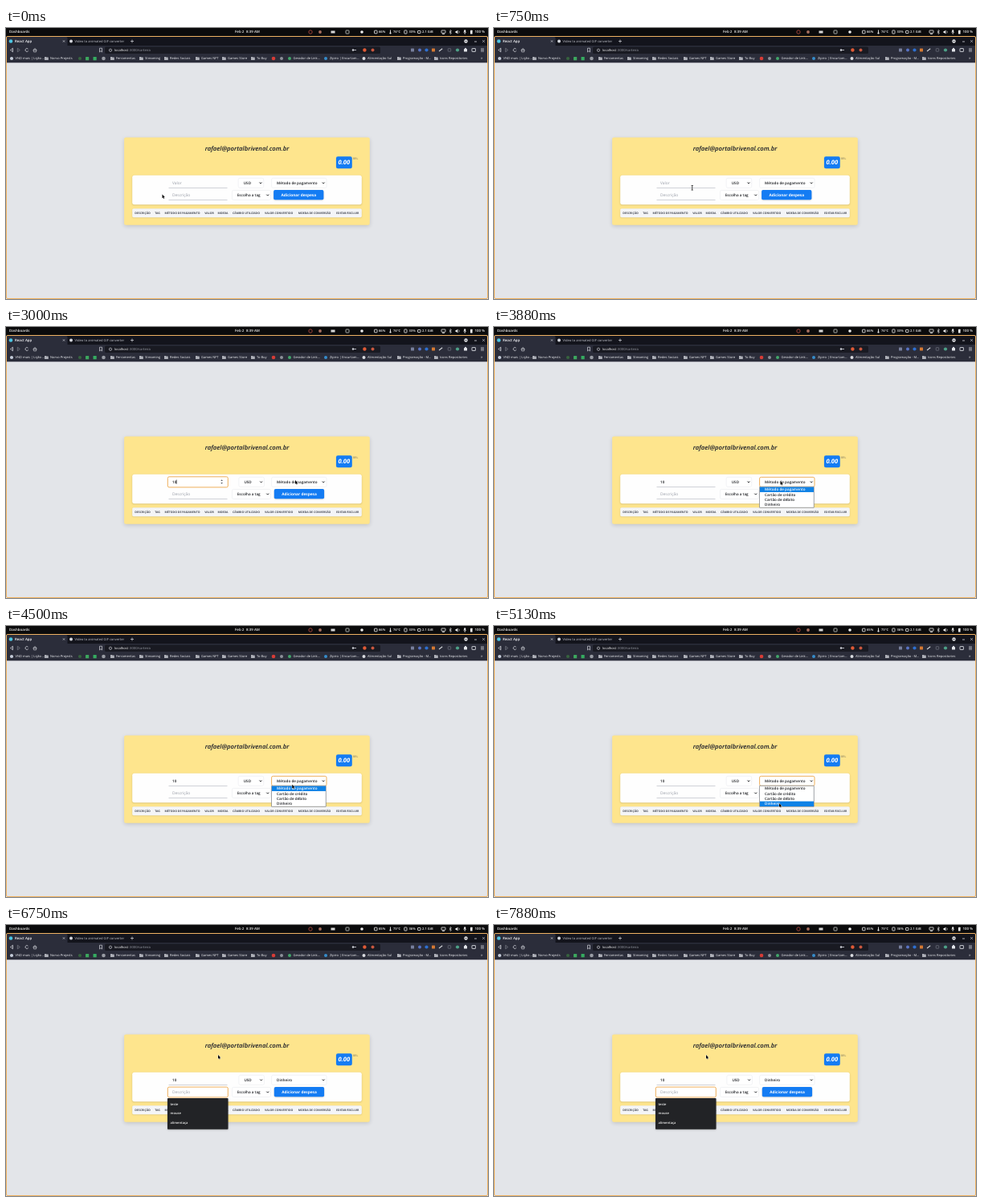
These frames come from a looping animation (600 by 338 pixels, 8 s). An HTML page with a canvas:

```html
<!DOCTYPE html>
<html lang="pt-BR">
<head>
<meta charset="utf-8">
<title>Carteira</title>
<style>
html, body { margin: 0; width: 100%; height: 100%; overflow: hidden; background: #e3e5e9; }
canvas { display: block; width: 600px; height: 338px; }
</style>
</head>
<body>
<canvas id="stage"></canvas>
<script>
const LOOP = 8000, STEP = 125, TEXT_SCALE = 20;
const canvas = document.getElementById('stage');
const ctx = canvas.getContext('2d');
const dpr = window.devicePixelRatio || 1;
canvas.width = 600 * dpr;
canvas.height = 338 * dpr;

const ORANGE = '#efab52', BLUE = '#147cf3', INK = '#1a1c20', HINT = '#989da7', BAR = '#2b2d3a';

// Pointer path: time, x, y of the hotspot
const path = [
  [0, 194.5, 207.5], [500, 226, 203], [875, 254, 198], [1000, 212, 198], [1250, 212, 195],
  [2250, 212, 195], [2625, 290, 203], [3000, 360, 191], [3250, 356.5, 192], [4250, 356.5, 192],
  [5125, 355, 221], [5750, 255, 209], [6000, 255, 209], [6750, 264, 162], [8000, 264, 162]
];

function pointerAt(t) {
  const i = Math.max(1, path.findIndex(p => p[0] >= t));
  const [t0, x0, y0] = path[i - 1], [t1, x1, y1] = path[i];
  const k = (t - t0) / (t1 - t0), e = k * k * (3 - 2 * k);
  return { x: x0 + (x1 - x0) * e, y: y0 + (y1 - y0) * e };
}

const within = (t, from, to) => t >= from && t < to;
const blink = (t, from) => Math.floor((t - from) / 625) % 2 === 0;

function rect(x, y, w, h, color) {
  ctx.fillStyle = color;
  ctx.fillRect(x, y, w, h);
}

function round(x, y, w, h, r, fill, stroke, width = 1) {
  ctx.beginPath();
  ctx.roundRect(x, y, w, h, r);
  if (fill) { ctx.fillStyle = fill; ctx.fill(); }
  if (stroke) { ctx.strokeStyle = stroke; ctx.lineWidth = width; ctx.stroke(); }
}

function raised(x, y, w, h, r, fill, blur, alpha) {
  ctx.save();
  ctx.shadowColor = `rgba(0,0,0,${alpha})`;
  ctx.shadowBlur = blur * dpr;
  ctx.shadowOffsetY = blur * dpr / 3;
  round(x, y, w, h, r, fill);
  ctx.restore();
}

function dot(x, y, r, color) {
  ctx.beginPath();
  ctx.arc(x, y, r, 0, 7);
  ctx.fillStyle = color;
  ctx.fill();
}

function ring(x, y, r, color, width, from = 0, to = 7) {
  ctx.beginPath();
  ctx.arc(x, y, r, from, to);
  ctx.strokeStyle = color;
  ctx.lineWidth = width;
  ctx.stroke();
}

function line(points, color, width = 0.8) {
  ctx.beginPath();
  points.forEach(([x, y]) => ctx.lineTo(x, y));
  ctx.strokeStyle = color;
  ctx.lineWidth = width;
  ctx.stroke();
}

function poly(points, fill) {
  ctx.beginPath();
  points.forEach(([x, y]) => ctx.lineTo(x, y));
  ctx.closePath();
  ctx.fillStyle = fill;
  ctx.fill();
}

// y is the visual middle of the line; large layout size keeps the small advances precise
function text(str, x, y, size, color, style = '400', align = 'left') {
  ctx.save();
  ctx.translate(x, y + size * 0.32);
  ctx.scale(1 / TEXT_SCALE, 1 / TEXT_SCALE);
  ctx.font = `${style} ${size * TEXT_SCALE}px "Open Sans", "Noto Sans", sans-serif`;
  ctx.textRendering = 'geometricPrecision';
  ctx.textAlign = align;
  ctx.fillStyle = color;
  ctx.fillText(str, 0, 0);
  ctx.restore();
}

const chevron = (x, y, color = INK, s = 1.4) =>
  line([[x - s, y - s / 2], [x, y + s / 2], [x + s, y - s / 2]], color, 1);

function cross(x, y, s, color) {
  line([[x - s, y - s], [x + s, y + s]], color, 0.7);
  line([[x - s, y + s], [x + s, y - s]], color, 0.7);
}

function folder(x, y) {
  rect(x - 2.3, y - 2, 2.2, 1, '#aeb0b8');
  round(x - 2.3, y - 1.5, 4.8, 3.6, 0.5, '#aeb0b8');
}

function drawPanel(t) {
  rect(0, 0, 600, 10, '#0b0b0c');
  const later = t >= 4625, white = '#f2f2f2', bold = '600';
  text('Dashboards', 4, 5, 4.4, white, bold);
  text('Feb 2', 285, 5, 4.4, white, bold);
  text('8:39 AM', 299, 5, 4.4, white, bold);
  const stats = [
    [464, later ? '65%' : '66%'], [482, later ? '73°C' : '74°C'],
    [501.5, later ? '36%' : '33%'], [518, '2.1 GiB']
  ];
  stats.forEach(([x, s]) => text(s, x, 5, 4.1, white, bold));
  text('100 %', 583.5, 5, 4.4, white, bold);

  ring(379, 5, 2.2, '#a8473d', 0.9);
  dot(391, 5, 1.9, '#a9705f');
  rect(404.5, 3.5, 5, 3, '#d8d8d8');
  round(423, 3, 4, 4, 0.6, null, '#b9beb9', 0.9);
  dot(443, 5, 1.8, white);
  round(458.5, 3.2, 3.6, 3.6, 0.5, null, white, 0.8);
  line([[478.5, 2.5], [478.5, 6]], white, 0.9);
  dot(478.5, 6.5, 1.1, white);
  round(495.8, 3, 3.2, 4, 0.5, null, white, 0.8);
  round(512.5, 3.5, 3.6, 3, 0.4, null, white, 0.8);
  round(542, 3, 5, 3.2, 0.4, null, white, 0.8);
  line([[543, 7.5], [546, 7.5]], white);
  line([[551.8, 3.7], [554.5, 6.3], [553.2, 7.6], [553.2, 2.4], [554.5, 3.7], [551.8, 6.3]], white, 0.6);
  poly([[559.5, 4], [560.7, 4], [562.3, 2.5], [562.3, 7.5], [560.7, 6], [559.5, 6]], white);
  line([[563.6, 3.5], [564.3, 5], [563.6, 6.5]], white, 0.6);
  round(570.2, 2.2, 2, 3.6, 1, white);
  line([[569.3, 5], [571.2, 6.8], [573, 5]], white, 0.6);
  line([[571.2, 6.5], [571.2, 8]], white, 0.6);
  round(578, 2.8, 2.6, 4.8, 0.5, white);
}

function drawBrowser() {
  const pale = '#d3d5db';
  rect(0, 10, 600, 12, '#13141c');
  round(1, 11, 75.5, 12, [1.5, 1.5, 0, 0], BAR);
  rect(0, 22, 600, 21.3, BAR);

  dot(6, 16.5, 2.3, '#4cc4e2');
  text('React App', 11, 16.5, 4.4, '#f6f6f8', '600');
  cross(72, 16.5, 1.1, pale);
  dot(81, 16.5, 2, '#d5d7dd');
  text('Video to animated GIF converter', 85.5, 16.5, 4.1, '#c6c8d0');
  line([[155, 16.5], [159, 16.5]], pale, 0.7);
  line([[157, 14.5], [157, 18.5]], pale, 0.7);
  dot(572.5, 16.5, 2.2, '#e6e7ea');
  chevron(572.5, 16.6, '#13141c', 0.9);
  line([[583, 17], [586, 17]], pale, 0.8);
  cross(594.5, 16.5, 1.3, pale);

  line([[8.5, 25.2], [5.5, 27.5], [8.5, 29.8], [8.5, 25.2]], pale, 0.8);
  line([[14.3, 25.2], [17.3, 27.5], [14.3, 29.8], [14.3, 25.2]], '#777a85', 0.8);
  ring(26, 27.5, 2, pale, 0.8, 0.5, 5.6);
  line([[33.5, 27.8], [36, 25.5], [38.5, 27.8]], pale, 0.8);
  round(34.4, 27.4, 3.2, 2.4, 0.2, null, pale, 0.7);
  round(123, 23.5, 343, 8.6, 1.5, '#191a22');
  line([[116.5, 25.2], [119.5, 25.2], [119.5, 30], [118, 28.6], [116.5, 30], [116.5, 25.2]], pale, 0.7);
  ring(130, 27.7, 1.6, pale, 0.7);
  text('localhost', 135, 27.6, 4.1, '#fff');
  text(':3000/carteira', 153, 27.6, 4.15, '#9da0aa');
  dot(432, 27.5, 1.2, pale);
  line([[432.5, 27.5], [436, 27.5]], pale, 0.8);
  dot(446.4, 27.5, 2.2, '#df5a36');
  dot(456.5, 27.5, 2, '#c8573f');

  round(504, 25.5, 4, 4, 0.6, '#777f9c');
  dot(515, 27.5, 2, '#5873c4');
  dot(523.5, 27.5, 2.1, '#2d6fd0');
  round(530, 25.5, 4, 4, 0.4, '#d57932');
  line([[539, 29], [543.2, 25.8]], '#d2d4d8', 1.1);
  round(550.2, 25.7, 3.5, 3.5, 0.4, null, '#686b76', 0.8);
  dot(562, 27.5, 2.1, '#4da187');
  round(570, 26, 4, 3.6, 0.5, '#e2e4e9');
  dot(572, 25.8, 1, '#e2e4e9');
  round(580, 25.5, 4.4, 4, 0.4, null, pale, 0.9);
  [25.8, 27.5, 29.2].forEach(y => line([[591, y], [595, y]], pale, 0.7));

  dot(7, 38, 2.1, '#c3cad8');
  const marks = [
    [11.5, 'VND mais | Lição ...'], [55, 'Norvo Projects', 1], [137, 'Ferramentas', 1],
    [173, 'Streaming', 1], [204, 'Redes Sociais', 1], [243, 'Games NFT', 1],
    [276, 'Games Store', 1], [312, 'To Buy', 1], [357.5, 'Gerador de Link...'],
    [403, 'Zipiro | Encurtam...'], [450, 'Alimentação Sul'],
    [494, 'Programação - M...', 1], [540, 'Icons Repositories', 1]
  ];
  marks.forEach(([x, label, isFolder]) => {
    if (isFolder) folder(x - 4.7, 38);
    text(label, x, 38, 4.05, '#f3f4f7');
  });
  dot(92, 38, 2.1, '#37633f');
  round(99, 36, 4.2, 4.2, 0.5, '#3ca65d');
  round(108.5, 36, 4.2, 4.2, 0.5, '#35ab60');
  dot(121.5, 38, 2.3, '#9a9da5');
  dot(333, 38, 2.3, '#d63c36');
  dot(343, 38, 2, '#8d9099');
  dot(353, 38, 2, '#42a66a');
  dot(398, 38, 2, '#368cca');
  dot(445.5, 38, 2, '#d8dadf');
  text('»', 591, 37.6, 5, '#dcdde2');
}

function input(y, h, label, value, focused, caret) {
  if (focused) {
    round(201.3, y - 0.2, 75, h + 0.4, 1.8, '#fff', ORANGE, 0.95);
  } else {
    line([[202.5, y + h - 0.2], [275.5, y + h - 0.2]], '#c3c6cd', 0.8);
  }
  const mid = y + h / 2 - 0.2;
  if (value) text(value, 207, mid, 4.6, INK, '600');
  else text(label, 207, mid, 4.9, HINT);
  if (focused && caret) {
    const x = 206.8 + value.length * 2.7;
    line([[x, mid - 2.6], [x, mid + 2.6]], '#17181b', 0.7);
  }
}

function select(x, y, w, label, pad, focused) {
  round(x, y - 6, w, 12, 1.8, '#fff', focused ? ORANGE : '#eceef1', focused ? 0.95 : 0.7);
  text(label, x + pad, y, 4.6, INK, '600');
  chevron(x + w - 3.8, y);
}

function suggestions(y, h, items) {
  raised(201, y, 75.5, h, 0.8, '#222326', 2, 0.3);
  items.forEach((s, i) => text(s, 204.5, y + 7.4 + i * 11.4, 4.1, '#f1f1f1', '600'));
}

function options(y) {
  const items = ['Método de pagamento', 'Cartão de crédito', 'Cartão de débito', 'Dinheiro'];
  const row = 6.35, top = 199.6;
  const active = Math.max(0, Math.min(3, Math.floor((y - top) / row)));
  round(330.5, top - 0.3, 67.8, row * 4 + 0.6, 0.3, '#fff', '#777a80', 0.7);
  rect(331, top + active * row, 67, row, '#0f82e6');
  items.forEach((s, i) => text(s, 337, top + (i + 0.5) * row, 4.6, i === active ? '#fff' : INK, '600'));
}

function drawPage(t, pointer) {
  const amountFocus = within(t, 875, 3500), methodFocus = within(t, 3500, 5500), noteFocus = t >= 5750;
  const amount = t < 1250 ? '' : t < 1625 ? '1' : '10';
  const caretStart = t < 1250 ? 875 : t < 1625 ? 1250 : 1625;
  // A focused text field is slightly wider and pushes its neighbours
  const push = amountFocus || noteFocus ? 0.7 : 0;

  rect(0, 43, 600, 295, '#e3e5e9');
  raised(147.1, 136.5, 305.7, 109.2, 2, '#fee58d', 5, 0.15);
  text('rafael@portalbrivenal.com.br', 300, 151, 7.75, '#161a26', 'italic 600', 'center');
  round(410.9, 160.2, 19.9, 15.1, 2.2, BLUE);
  text('0.00', 420.8, 168, 7.6, '#fff', 'italic 700', 'center');
  text('BRL', 432, 163, 3.5, '#77715a');

  raised(157.2, 183.7, 285.6, 36.5, 2.6, '#fefefe', 2.4, 0.16);
  input(187, 12.7, 'Valor', amount, amountFocus, blink(t, caretStart));
  if (amountFocus) {
    poly([[267.3, 192.1], [268.6, 190.2], [269.9, 192.1]], '#55585f');
    poly([[267.3, 193.9], [268.6, 195.8], [269.9, 193.9]], '#55585f');
  }
  select(289.2 + push, 193.3, 31.5, 'USD', 6.5);
  select(330.6, 193.3, 68.4, t < 5250 ? 'Método de pagamento' : 'Dinheiro', 6.4, methodFocus);
  input(202.3, 12.4, 'Descrição', '', noteFocus, blink(t, 5875));
  select(281.5, 208.4, 48, 'Escolha a tag', 6.3);
  raised(333.1 + push, 202.1, 62.3, 12.2, 1.8, BLUE, 2, 0.18);
  text('Adicionar despesa', 364.3 + push, 208.1, 4.8, '#fff', '700', 'center');

  raised(157.2, 225.2, 285.6, 11, 1.6, '#f4f5f7', 2, 0.14);
  const heads = [
    [170, 'DESCRIÇÃO'], [188.5, 'TAG'], [219.5, 'MÉTODO DE PAGAMENTO'], [253, 'VALOR'],
    [270, 'MOEDA'], [299, 'CÂMBIO UTILIZADO'], [339.7, 'VALOR CONVERTIDO'],
    [384, 'MOEDA DE CONVERSÃO'], [425.2, 'EDITAR/EXCLUIR']
  ];
  heads.forEach(([x, s]) => text(s, x, 230.5, 3.5, '#474b56', '700', 'center'));

  if (within(t, 1500, 2000)) suggestions(200.6, 27.2, ['1', '10']);
  if (within(t, 3500, 5250)) options(pointer.y);
  if (t >= 5875) suggestions(216, 38.8, ['teste', 'mouse', 'alimentaça']);
}

function drawPointer({ x, y }) {
  const overField = x > 202 && x < 276 && ((y > 187 && y < 200) || (y > 202 && y < 215));
  if (overField) {
    line([[x, y - 2.7], [x, y + 2.7]], '#1c1c1e', 0.8);
    line([[x - 1.2, y - 2.8], [x + 1.2, y - 2.8]], '#1c1c1e', 0.7);
    line([[x - 1.2, y + 2.8], [x + 1.2, y + 2.8]], '#1c1c1e', 0.7);
    return;
  }
  const shape = [[0, 0], [0, 4.8], [1.1, 3.9], [1.8, 5.4], [2.6, 5], [1.9, 3.5], [3.3, 3.4]]
    .map(([dx, dy]) => [x + dx, y + dy]);
  line([...shape, shape[0]], '#f4f4f4', 0.7);
  poly(shape, '#0c0c0d');
}

function draw(now) {
  const t = Math.floor((now % LOOP) / STEP) * STEP;
  const pointer = pointerAt(t);
  ctx.setTransform(dpr, 0, 0, dpr, 0, 0);
  drawPage(t, pointer);
  drawPanel(t);
  drawBrowser();
  round(0.5, 10.5, 599, 327, 1.5, null, '#efb263', 1);
  drawPointer(pointer);
}

let start;
function tick(now) {
  start ??= now;
  draw(now - start);
  requestAnimationFrame(tick);
}
draw(0);
requestAnimationFrame(tick);
</script>
</body>
</html>
```
